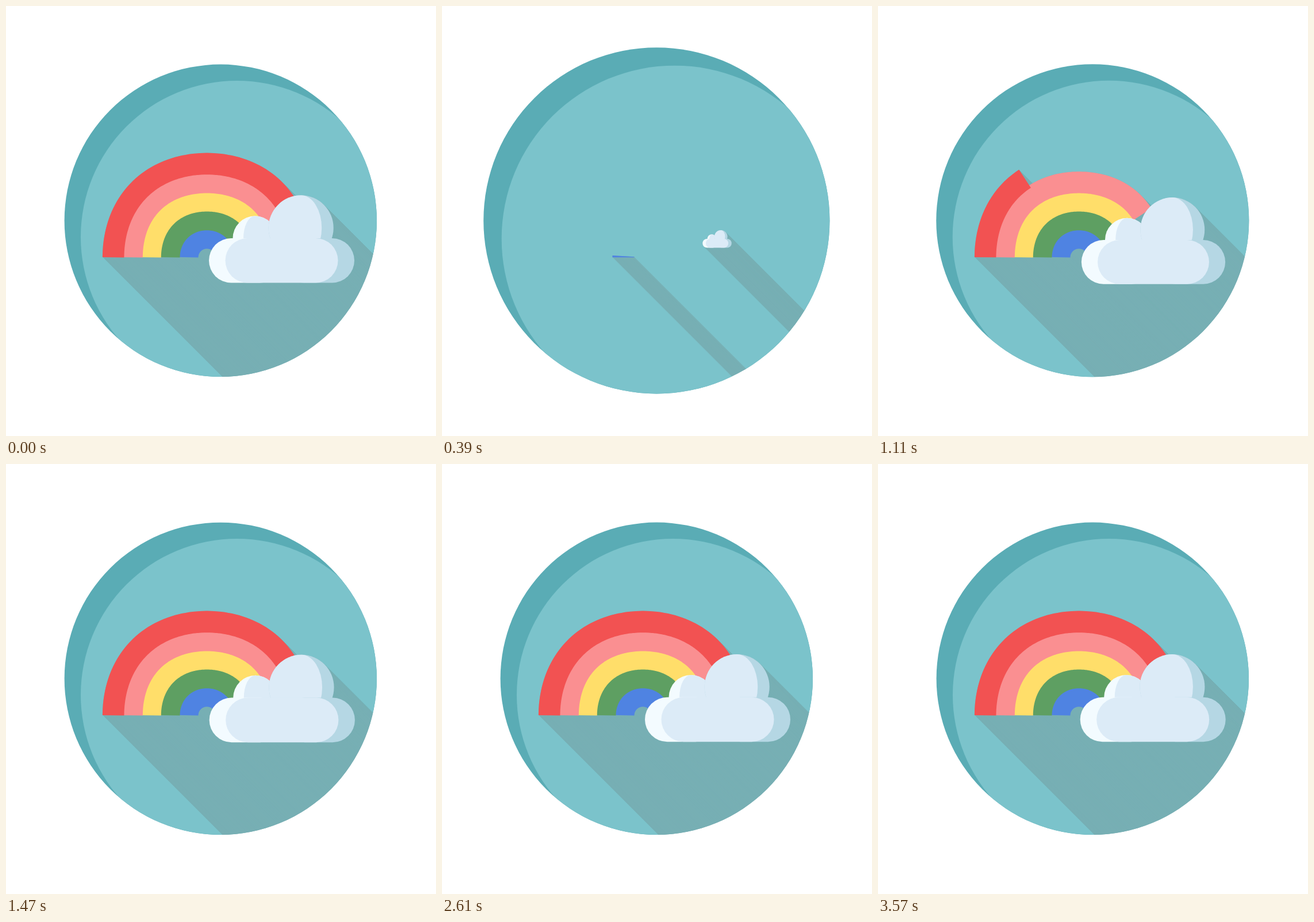
Write an HTML page with a canvas that moves like this. It is 748x748 px and loops after 3.6 s.

```html
<!DOCTYPE html>
<html lang="en">
<head>
<meta charset="utf-8">
<title>Rainbow and cloud</title>
<style>
  html, body { margin: 0; width: 100%; height: 100%; overflow: hidden; background: #fff; }
  canvas { display: block; }
</style>
</head>
<body>
<canvas id="stage" width="748" height="748"></canvas>
<script>
const SIZE = 748, LOOP = 3600, STEP = 30;
const SHADOW = '#77afb4', LIGHT = '#dcebf7', WHITE = '#f3fbff', SHADE = '#b5d7e4';
const canvas = document.getElementById('stage');
const stage = canvas.getContext('2d');
const shadowCanvas = document.createElement('canvas');
shadowCanvas.width = shadowCanvas.height = SIZE;
const shadow = shadowCanvas.getContext('2d');

// Inner to outer; outer bands cover the rim of the inner ones.
const bands = [
  { color: '#4f83e2', radius: 34, width: 38, bulge: 0 },
  { color: '#5e9f62', radius: 65.5, width: 37, bulge: 0.5 },
  { color: '#ffde6a', radius: 98, width: 36.5, bulge: 2 },
  { color: '#fa8f91', radius: 130.4, width: 37.5, bulge: 3.5 },
  { color: '#f25252', radius: 162.8, width: 37.6, bulge: 3.5 }
];

// Cloud drift: time, x, y
const drift = [
  [0, 0, 0], [390, -1, 0], [630, -1.5, -0.2], [1110, -0.5, 3], [1890, 2.4, 2.1],
  [2610, 0, 1.7], [3240, -1.2, -0.5], [3570, -1.3, 1.8], [3600, 0, 0]
];

const smooth = u => u * u * (3 - 2 * u);
const clamp = u => Math.min(1, Math.max(0, u));

// Linear growth followed by a damped bounce.
function pop(t) {
  if (t < 300) return Math.max(0, t / 300);
  const s = (t - 300) / 1000;
  return 1 + 0.318 * Math.exp(-7 * s) * Math.sin(3 * Math.PI * s);
}

function driftAt(t) {
  const i = Math.max(1, drift.findIndex(k => k[0] >= t));
  const [t0, x0, y0] = drift[i - 1], [t1, x1, y1] = drift[i];
  const u = smooth((t - t0) / (t1 - t0));
  return [x0 + (x1 - x0) * u, y0 + (y1 - y0) * u];
}

function disc(c, x, y, r, color) {
  c.fillStyle = color;
  c.beginPath();
  c.arc(x, y, r, 0, 2 * Math.PI);
  c.fill();
}

function drawBadge(t) {
  const s = pop(t - 34);
  stage.save();
  stage.translate(373.3, 373.3);
  stage.scale(s, s);
  disc(stage, 0, 0, 271.7, '#5aacb5');
  stage.clip();
  disc(stage, 28.4, 28.4, 271.7, '#7bc3cb');
  stage.restore();
}

function drawRainbow(c, t, tint) {
  bands.forEach(({ color, radius, width, bulge }, i) => {
    const sweep = smooth(clamp((t - 355 - i * 149.5) / 425));
    if (!sweep) return;
    c.beginPath();
    for (let k = 0; k <= 90; k++) {
      const a = Math.PI * sweep * k / 90;
      const r = radius + bulge * Math.sin(2 * a) ** 2;
      c.lineTo(349.5 - r * Math.cos(a), 437.2 - r * Math.sin(a));
    }
    c.strokeStyle = tint || color;
    c.lineWidth = width;
    c.stroke();
  });
}

// Round puff whose left and right halves may differ in width.
function puff(c, x, y, left, right, r, color) {
  c.fillStyle = color;
  c.beginPath();
  c.ellipse(x, y, right, r, 0, -Math.PI / 2, Math.PI / 2);
  c.ellipse(x, y, left, r, 0, Math.PI / 2, Math.PI * 1.5);
  c.fill();
}

function pill(c, x0, x1, color) {
  c.fillStyle = color;
  c.beginPath();
  c.roundRect(x0, 404, x1 - x0, 77.5, 38.75);
  c.fill();
}

function drawCloud(c, t, tint) {
  const s = pop(t - 330), [dx, dy] = driftAt(t);
  if (!s) return;
  c.save();
  c.translate(479.5 + dx, 405.2 + dy);
  c.scale(s, s);
  c.translate(-479.5, -405.2);
  puff(c, 433, 404, 38.5, 38.5, 38.7, tint || WHITE);
  puff(c, 433, 404, 20, 38.5, 38.7, tint || LIGHT);
  puff(c, 513.2, 386, 56.5, 56.5, 56.7, tint || SHADE);
  puff(c, 513.2, 386, 56.5, 36, 56.7, tint || LIGHT);
  pill(c, 353, 480, tint || WHITE);
  pill(c, 480, 606, tint || SHADE);
  pill(c, 381.5, 577.5, tint || LIGHT);
  c.restore();
}

// Extrudes the silhouettes diagonally by repeated doubling.
function drawShadow(t) {
  shadow.clearRect(0, 0, SIZE, SIZE);
  drawRainbow(shadow, t, SHADOW);
  drawCloud(shadow, t, SHADOW);
  for (let d = 1; d < 512; d *= 2) shadow.drawImage(shadowCanvas, d, d);
  stage.globalCompositeOperation = 'source-atop';
  stage.drawImage(shadowCanvas, 0, 0);
  stage.globalCompositeOperation = 'source-over';
}

function draw(t) {
  stage.clearRect(0, 0, SIZE, SIZE);
  drawBadge(t);
  drawShadow(t);
  drawRainbow(stage, t);
  drawCloud(stage, t);
}

const start = performance.now();
function tick() {
  const t = Math.floor((performance.now() - start) % LOOP / STEP) * STEP;
  draw(t || LOOP); // the loop opens on its finished pose
  requestAnimationFrame(tick);
}
tick();
</script>
</body>
</html>
```
